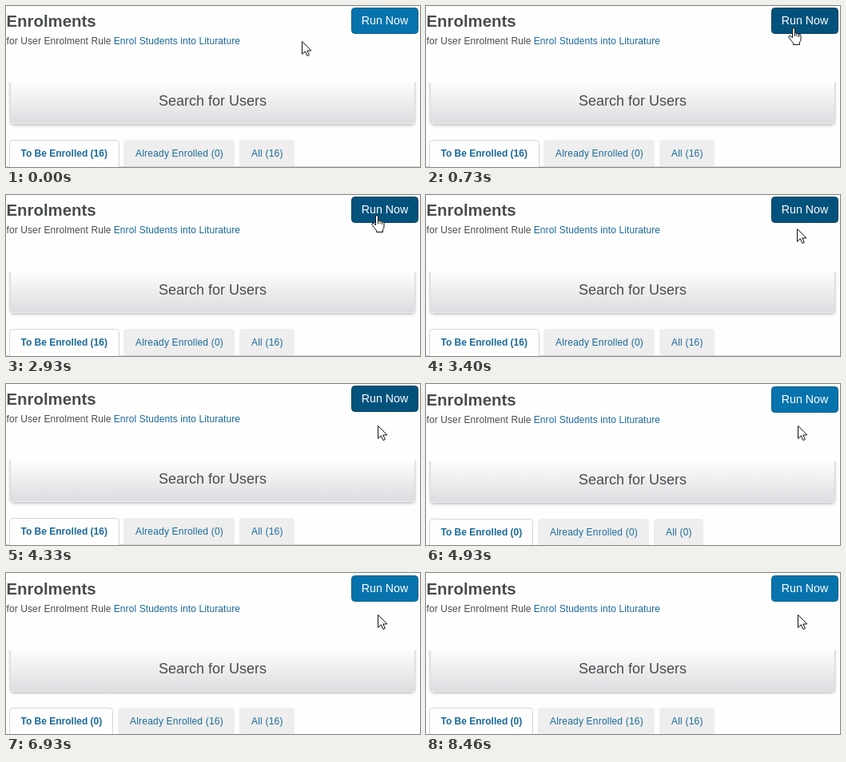
Recreate the animation shown at these times as an HTML page with a canvas. Size 518 by 202 pixels, loop 8530 ms.

```html
<!DOCTYPE html>
<html lang="en">
<head>
<meta charset="utf-8">
<title>Enrolments</title>
<style>
html, body { margin: 0; width: 100%; height: 100%; overflow: hidden; background: #fefefe; }
canvas { display: block; }
</style>
</head>
<body>
<canvas id="stage" width="518" height="202"></canvas>
<script>
const ctx = document.getElementById('stage').getContext('2d');
const LOOP = 8530, STEP = 1000 / 15;
const RELOADED = 4930, COUNTED = 6000;
const INK = '#494c4e', LINK = '#1a6a9a';

const ARROW = new Path2D('M.5.5V16.5L4.3 12.9L6.9 18.6L9.4 17.5L6.8 12H11.8Z');
const HAND = new Path2D('M5.5 13V2Q5.5.5 7 .5T8.5 2V7.2Q9.8 6.3 11 7.6Q12.4 7 13.4 8.4Q16 8 16 10.8V14Q16 17 14.5 18.5V21.5H6.5V19.5Q4 16.5 1 12.5Q.4 10.5 2.2 10.3Q3.8 10.6 5.5 13Z');
const KNUCKLES = new Path2D('M8.5 7V11M11 8V11M13.5 9V12');

// time, x, y of the pointer's hot spot
const POINTER = [
  [100, 370, 44], [730, 459, 27], [2860, 459, 27],
  [2940, 463, 25], [3060, 463, 25], [3660, 465, 52]
];

function pointerAt(t) {
  const next = POINTER.findIndex(p => p[0] > t);
  if (next === 0) return POINTER[0].slice(1);
  if (next < 0) return POINTER.at(-1).slice(1);
  const [t0, x0, y0] = POINTER[next - 1], [t1, x1, y1] = POINTER[next];
  const u = (t - t0) / (t1 - t0), k = u * u * (3 - 2 * u);
  return [Math.round(x0 + (x1 - x0) * k), Math.round(y0 + (y1 - y0) * k)];
}

function text(str, x, y, font, color, spacing = 0, align = 'left') {
  ctx.font = font + ' "Liberation Sans", Arial, sans-serif';
  ctx.letterSpacing = spacing + 'px';
  ctx.textAlign = align;
  ctx.fillStyle = color;
  ctx.fillText(str, x, y);
}

function box(x, y, w, h, radii, fill, stroke) {
  ctx.beginPath();
  ctx.roundRect(x, y, w, h, radii);
  ctx.fillStyle = fill;
  ctx.fill();
  if (stroke) {
    ctx.strokeStyle = stroke;
    ctx.stroke();
  }
}

function drawButton(dark) {
  box(432.5, 2.5, 83, 32, 4, dark ? '#02527c' : '#0673ad', dark ? '#023f60' : '#055b89');
  text('Run Now', 474, 23, '14.2px', '#fff', 0, 'center');
}

function drawPanel() {
  const shade = ctx.createLinearGradient(0, 96, 0, 148);
  shade.addColorStop(0, '#fdfdfe');
  shade.addColorStop(1, '#dcdce0');
  ctx.save();
  ctx.beginPath();
  ctx.rect(0, 96, 518, 60);
  ctx.clip();
  ctx.shadowColor = 'rgba(0,0,0,.35)';
  ctx.shadowBlur = 4;
  ctx.shadowOffsetY = 1;
  box(6, 92, 505, 56, [0, 0, 4, 4], '#f4f4f5');
  ctx.restore();
  box(6, 96, 505, 52, [0, 0, 4, 4], shade);
  box(7, 147, 503, 1, 0, '#efeff1');
  text('Search for Users', 258.5, 125, '18px', INK, 0, 'center');
}

function drawTabs(pending, enrolled, all) {
  const first = pending ? 141 : 133;
  const second = first + (pending ? 6 : 7);
  const secondWidth = enrolled ? 146 : 139;
  const third = second + secondWidth + 6;
  box(0, 201, 518, 1, 0, '#d3d5d8');
  box(4.5, 168.5, first - 4, 40, [4, 4, 0, 0], '#fefefe', '#d3d5d8');
  box(second, 168, secondWidth, 33, [4, 4, 0, 0], '#eeeeee');
  box(third, 168, all ? 69 : 62, 33, [4, 4, 0, 0], '#eeeeee');
  text(`To Be Enrolled (${pending})`, 18.5, 189, 'bold 12px', LINK);
  text(`Already Enrolled (${enrolled})`, second + 15, 189, '12px', LINK, .2);
  text(`All (${all})`, third + 15, 189, '12px', LINK, .2);
}

function drawPointer(x, y, isHand) {
  ctx.save();
  ctx.translate(isHand ? x - 6 : x, y);
  ctx.fillStyle = '#fff';
  ctx.strokeStyle = '#111';
  ctx.fill(isHand ? HAND : ARROW);
  ctx.stroke(isHand ? HAND : ARROW);
  if (isHand) ctx.stroke(KNUCKLES);
  ctx.restore();
}

function draw(t) {
  const [x, y] = pointerAt(t);
  const over = x >= 432 && y < 36;
  const reloaded = t >= RELOADED;
  const counted = t >= COUNTED;

  ctx.fillStyle = '#fefefe';
  ctx.fillRect(0, 0, 518, 202);
  ctx.save();
  if (reloaded) ctx.translate(0, 1);
  text('Enrolments', .5, 26, 'bold 20.4px', INK);
  text('for User Enrolment Rule ', .5, 48, '12px', INK, .1);
  text('Enrol Students into Liturature', 134.7, 48, '12px', LINK, .1);
  // the button keeps its pressed colour until the page has reloaded
  drawButton(over || (t > 2900 && !reloaded));
  drawPanel();
  drawTabs(reloaded ? 0 : 16, counted ? 16 : 0, reloaded && !counted ? 0 : 16);
  ctx.restore();
  drawPointer(x, y, over);
}

function frame() {
  const t = performance.now() % LOOP;
  draw(Math.floor(t / STEP + .05) * STEP + 5);
  requestAnimationFrame(frame);
}
frame();
</script>
</body>
</html>
```
